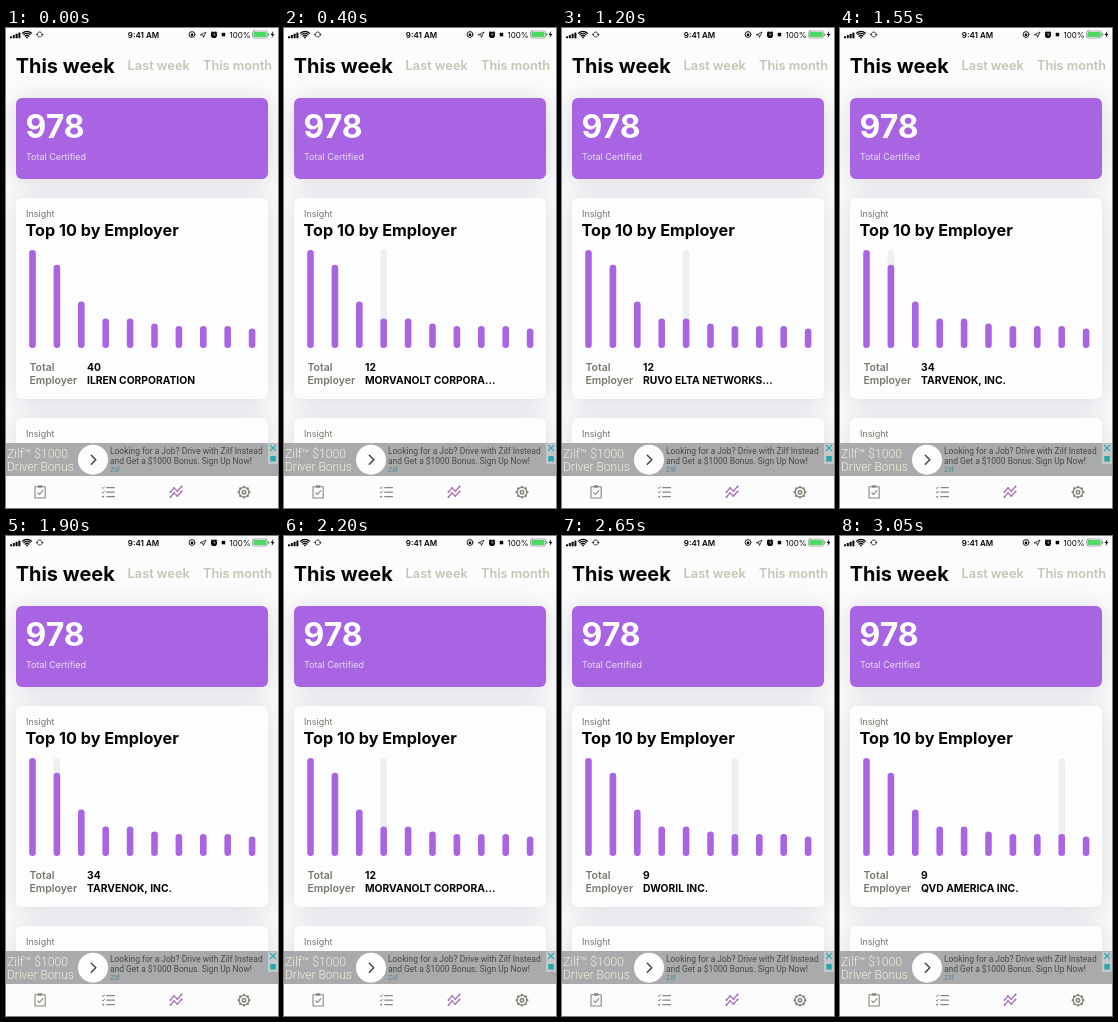
Recreate the animation shown at these times as an HTML page with a canvas. Size 272x480 px, loop 3070 ms.

```html
<!DOCTYPE html>
<html lang="en">
<head>
<meta charset="utf-8">
<title>Weekly insight</title>
<style>
  html, body { margin: 0; width: 100%; height: 100%; overflow: hidden; background: #fcfcfd; }
  canvas { display: block; width: 272px; height: 480px; }
</style>
</head>
<body>
<canvas id="stage"></canvas>
<script>
const W = 272, H = 480, LOOP = 3070;
const canvas = document.getElementById('stage');
const scale = window.devicePixelRatio || 1;
canvas.width = W * scale;
canvas.height = H * scale;
const c = canvas.getContext('2d');

const INK = '#050505', MUTED = '#78766a', PALE = '#c6c4b4', PURPLE = '#a964e4';
const SANS = 'Inter, "Open Sans", sans-serif';
const AD_FONT = 'Roboto, Inter, sans-serif';

const employers = [
  [40, 'ILREN CORPORATION'],
  [34, 'TARVENOK, INC.'],
  [19, 'ORBRENTA LLC'],
  [12, 'MORVANOLT CORPORA...'],
  [12, 'RUVO ELTA NETWORKS...'],
  [10, 'GRENWICK SYSTEMS'],
  [9, 'DWORIL INC.'],
  [9, 'MARDOVEX LLC'],
  [9, 'QVD AMERICA INC.'],
  [8, 'SOLBRENDA INC.']
];

// Finger position over the chart: [time in ms, bar index]
const drag = [[0, 0], [60, 0], [720, 6], [850, 7], [1200, 4], [1550, 1],
              [1720, 0], [1820, 0], [2200, 3], [2650, 6], [3050, 8], [LOOP, 8]];

function selectedAt(t) {
  const i = drag.findIndex(p => p[0] > t);
  const [t0, a] = drag[i - 1], [t1, b] = drag[i];
  return Math.round(a + (b - a) * (t - t0) / (t1 - t0));
}

function text(str, x, y, size, weight, color, family = SANS) {
  c.font = `${weight} ${size}px ${family}`;
  c.fillStyle = color;
  c.fillText(str, x, y);
}

function box(x, y, w, h, r, color) {
  c.beginPath();
  c.roundRect(x, y, w, h, r);
  c.fillStyle = color;
  c.fill();
}

function disc(x, y, r, color) {
  c.beginPath();
  c.arc(x, y, r, 0, Math.PI * 2);
  c.fillStyle = color;
  c.fill();
}

function ring(x, y, r, color, width, from = 0, to = Math.PI * 2) {
  c.beginPath();
  c.arc(x, y, r, from, to);
  c.strokeStyle = color;
  c.lineWidth = width;
  c.stroke();
}

function line(points, color, width) {
  c.beginPath();
  points.forEach(([x, y]) => c.lineTo(x, y));
  c.strokeStyle = color;
  c.lineWidth = width;
  c.lineCap = c.lineJoin = 'round';
  c.stroke();
}

function shape(points, color) {
  c.beginPath();
  points.forEach(([x, y]) => c.lineTo(x, y));
  c.fillStyle = color;
  c.fill();
}

function card(y, h, color) {
  c.save();
  c.shadowColor = 'rgba(130, 126, 148, 0.28)';
  c.shadowBlur = 27 * scale;
  c.shadowOffsetY = 2 * scale;
  box(10, y, 252, h, 6, color);
  c.restore();
}

function statusBar() {
  for (let i = 0; i < 4; i++) box(4 + i * 2.8, 8.2 - i * 1.2, 2, 2 + i * 1.2, 0.5, INK);
  for (const r of [2.6, 4.6, 6.6]) ring(21, 10, r, INK, 1.3, -2.32, -0.82);
  disc(21, 9.4, 0.9, INK);
  ring(33.7, 6.5, 2.6, '#333', 0.9, -2.6, 0.1);
  ring(33.7, 6.5, 2.6, '#333', 0.9, 0.5, 3.2);
  shape([[35, 6], [37.6, 6], [36.3, 7.8]], '#333');
  shape([[29.8, 7], [32.4, 7], [31.1, 5.2]], '#333');

  text('9:41 AM', 121.8, 10, 8, 600, INK);

  ring(186, 6.5, 2.9, INK, 0.9);
  box(184.8, 6, 2.4, 2, 0.3, INK);
  ring(186, 6, 0.8, INK, 0.5, Math.PI, 0);
  line([[194.5, 6.8], [200, 4], [197.4, 9.5], [197, 7], [194.5, 6.8]], INK, 0.7);
  disc(208, 6.9, 3.1, INK);
  line([[208, 5.4], [208, 7], [209.2, 7]], '#fff', 0.6);
  line([[205.2, 4.5], [206.2, 3.7]], INK, 1);
  line([[210.8, 4.5], [209.8, 3.7]], INK, 1);
  box(215.7, 4.8, 3.5, 3.5, 0, INK);
  text('100%', 223.5, 10, 8, 400, INK);
  c.beginPath();
  c.roundRect(246.5, 3, 15, 7, 1.6);
  c.strokeStyle = '#777';
  c.lineWidth = 0.6;
  c.stroke();
  box(247.4, 3.9, 13.2, 5.2, 0.9, '#4cd964');
  box(262.2, 5.2, 1, 2.6, 0.5, '#777');
  shape([[267.3, 3], [264.7, 7], [266.3, 7], [265.6, 10], [268.4, 5.9], [266.7, 5.9]], INK);
}

function chart(selected) {
  const top = 222, full = 98, width = 6.6;
  employers.forEach(([total], i) => {
    const x = 23.2 + i * 24.4, h = full * total / 40;
    if (i === selected) box(x, top, width, full, width / 2, '#eeeef3');
    box(x, top + full - h, width, h, width / 2, PURPLE);
  });
  const [total, name] = employers[selected];
  text('Total', 23.5, 342.5, 10.5, 600, MUTED);
  text('Employer', 23.5, 355.5, 10.5, 600, MUTED);
  text(total, 81, 342.5, 10.3, 700, INK);
  text(name, 81, 355.5, 10.3, 700, INK);
}

function advert() {
  c.fillStyle = '#a9aaab';
  c.fillRect(0, 415, W, 33);
  text('Zilf™ $1000', 1, 430, 12.2, 300, '#f0f1dc', AD_FONT);
  text('Driver Bonus', 1, 443, 12, 300, '#f0f1dc', AD_FONT);
  disc(87, 431.7, 15, '#fdfdfd');
  line([[85.3, 427.3], [89.8, 431.8], [85.3, 436.3]], '#444', 1.5);
  text('Looking for a Job? Drive with Zilf Instead', 104, 426.3, 8.45, 400, '#484a44', AD_FONT);
  text('and Get a $1000 Bonus. Sign Up Now!', 104, 436.3, 8.45, 400, '#484a44', AD_FONT);
  text('Zilf', 104, 444, 7, 400, '#5c8794', AD_FONT);
  box(262, 415.5, 10, 20.5, 0, '#c3c8c8');
  line([[264.4, 417.4], [269.6, 422.6]], '#28a6ad', 1.2);
  line([[269.6, 417.4], [264.4, 422.6]], '#28a6ad', 1.2);
  box(264.3, 428, 5.5, 5.5, 0, '#28a6ad');
}

function tabBar() {
  const tint = '#88867a', accent = '#a873b8';
  c.fillStyle = '#fcfcfd';
  c.fillRect(0, 448, W, 32);

  line([[31.5, 458.8], [29, 458.8], [29, 470], [39.2, 470], [39.2, 458.8], [36.7, 458.8]], tint, 1.1);
  box(31.8, 457.2, 4.6, 2.6, 0.6, tint);
  line([[31.8, 464.8], [33.5, 466.5], [36.8, 462.7]], tint, 1.1);

  for (let i = 0; i < 3; i++) {
    const y = 459.7 + i * 4.5;
    line([[100.8, y], [108.4, y]], tint, 1.2);
    if (i < 2) line([[96, y], [96.9, y + 0.9], [98.6, y - 1]], tint, 1);
    else disc(97.2, y, 1, tint);
  }

  const steps = [[164.5, 0], [168, -4], [171.4, -1], [175.6, -5.5]];
  for (const y of [464, 469]) {
    line(steps.map(([x, dy]) => [x, y + dy]), accent, 1.2);
    for (const [x, dy] of steps) disc(x, y + dy, 1, accent);
  }

  for (let i = 0; i < 8; i++) {
    const a = i * Math.PI / 4, dx = Math.cos(a), dy = Math.sin(a);
    line([[238 + dx * 5, 464.2 + dy * 5], [238 + dx * 5.4, 464.2 + dy * 5.4]], tint, 2.2);
  }
  ring(238, 464.2, 4.9, tint, 1.3);
  ring(238, 464.2, 1.7, tint, 1.6);
}

function draw(t) {
  c.setTransform(scale, 0, 0, scale, 0, 0);
  c.fillStyle = '#fcfcfd';
  c.fillRect(0, 0, W, H);

  card(70, 81, PURPLE);
  card(170, 201, '#fdfdfe');
  card(390, 120, '#fdfdfe');

  statusBar();
  text('This week', 9.7, 45, 19.95, 700, INK);
  text('Last week', 121.6, 42, 12.75, 600, PALE);
  text('This month', 197, 42, 12.75, 600, PALE);

  text('978', 19.5, 110, 32, 700, '#fdfdfd');
  text('Total Certified', 20, 132, 9, 400, '#eadcf4');

  text('Insight', 20, 189, 9, 400, MUTED);
  text('Top 10 by Employer', 19.5, 208, 16.2, 700, INK);
  chart(selectedAt(t));

  text('Insight', 20, 409, 9, 400, MUTED);
  advert();
  tabBar();
}

const start = performance.now();
function tick(now) {
  draw(Math.max(0, now - start) % LOOP);
  requestAnimationFrame(tick);
}
draw(0);
requestAnimationFrame(tick);
</script>
</body>
</html>
```
